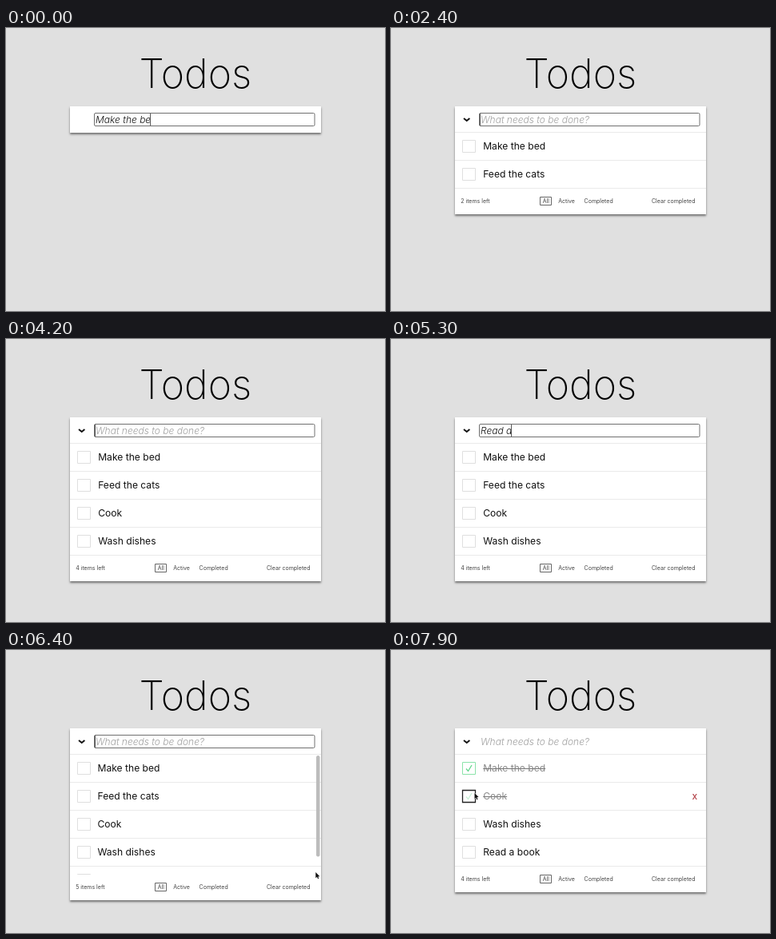
Recreate the animation shown at these times as an HTML page with a canvas. Size 474x354 px, loop 8 s.

```html
<!DOCTYPE html>
<html lang="en">
<head>
<meta charset="utf-8">
<title>Todos</title>
<style>
  html, body { margin: 0; width: 100%; height: 100%; overflow: hidden; background: #e0e0e0; }
  canvas { display: block; width: 474px; height: 354px; }
</style>
</head>
<body>
<canvas id="stage"></canvas>
<script>
const W = 474, H = 354, LOOP = 8000, STEP = 100;
const LEFT = 80, RIGHT = 394, TOP = 98, LIST_TOP = 130.5, ROW = 35, MAX_LIST = 150;
const canvas = document.getElementById('stage');
const ctx = canvas.getContext('2d');
const dpr = window.devicePixelRatio || 1;
canvas.width = W * dpr;
canvas.height = H * dpr;

// Each todo: typing start, characters visible at every step, moment of Enter.
const todos = [
  { text: 'Make the bed', start: 0, typed: [11, 12], enter: 300, done: 7500 },
  { text: 'Feed the cats', start: 600, typed: [1, 2, 3, 4, 6, 8, 9, 10, 11, 12, 13], enter: 1700, removed: 7000 },
  { text: 'Cook', start: 2500, typed: [1, 2, 4], enter: 2800, done: 7800 },
  { text: 'Wash dishes', start: 3300, typed: [1, 2, 3, 4, 6, 7, 9, 10, 11], enter: 4200 },
  { text: 'Read a book', start: 4800, typed: [1, 2, 3, 4, 4, 6, 8, 9, 11], enter: 5700 }
];
const BLUR = 7000;

// Pointer path: time, x, y
const path = [
  [6300, 390, 296], [6700, 372.5, 181.5], [7100, 372.5, 181.5],
  [7400, 99, 149], [7600, 99, 149], [7700, 104.5, 179], [8000, 104.5, 179]
];

function pointerAt(t) {
  if (t < path[0][0]) return null;
  const i = path.findIndex(p => p[0] > t);
  const [t0, x0, y0] = path[i - 1], [t1, x1, y1] = path[i];
  const k = (t - t0) / (t1 - t0), e = k * k * (3 - 2 * k);
  return { x: x0 + (x1 - x0) * e, y: y0 + (y1 - y0) * e };
}

function text(str, x, y, size, color = '#111', weight = 400, style = 'normal') {
  ctx.font = `${style} ${weight} ${size}px Inter, sans-serif`;
  ctx.fillStyle = color;
  ctx.fillText(str, x, y);
  return ctx.measureText(str).width;
}

function fill(x, y, w, h, color) {
  ctx.fillStyle = color;
  ctx.fillRect(x, y, w, h);
}

function box(x, y, w, h, color, width = 1, radius = 0) {
  ctx.strokeStyle = color;
  ctx.lineWidth = width;
  ctx.beginPath();
  ctx.roundRect(x, y, w, h, radius);
  ctx.stroke();
}

function line(points, color, width) {
  ctx.strokeStyle = color;
  ctx.lineWidth = width;
  ctx.beginPath();
  points.forEach(([x, y]) => ctx.lineTo(x, y));
  ctx.stroke();
}

function separator(y) {
  fill(LEFT, y - 0.5, RIGHT - LEFT, 1, '#eaeaea');
}

function drawCard(bottom) {
  ctx.save();
  ctx.shadowColor = 'rgba(0,0,0,.5)';
  ctx.shadowBlur = 2.5 * dpr;
  ctx.shadowOffsetY = 2 * dpr;
  fill(LEFT, TOP, RIGHT - LEFT, bottom - TOP, '#fff');
  ctx.restore();
}

function drawInput(t) {
  const typing = todos.find(d => t >= d.start && t < d.enter);
  let end = 112;
  if (typing) {
    const i = Math.min(Math.floor((t - typing.start) / STEP), typing.typed.length - 1);
    end += text(typing.text.slice(0, typing.typed[i]), 112, 118.8, 12, '#111', 300, 'italic');
  } else {
    text('What needs to be done?', 112, 118.8, 12, '#a0a0a0', 300, 'italic');
  }
  if (t >= BLUR) return;
  box(110.5, 106.5, 275.5, 16, '#707070', 1, 1.5);
  const last = todos.filter(d => d.enter <= t).pop();
  const lit = typing || Math.floor((t - last.enter) / 300) % 2 === 0;
  if (lit) fill(Math.round(end) - 1, 107, 1, 15, '#555');
}

function drawRow(todo, y, t, pointer, scrolls) {
  const mid = y + ROW / 2, done = t >= todo.done;
  const hover = pointer && pointer.y > y && pointer.y < y + ROW;
  const onBox = hover && pointer.x < 107;
  box(89.5, mid - 7.5, 16, 15, onBox ? '#222' : done ? '#8be3aa' : '#dfdfdf', onBox ? 1.3 : 1);
  if (done) {
    ctx.globalAlpha = Math.min(1, 0.1 + (t - todo.done) / 400);
    line([[94, mid + 0.5], [96.5, mid + 3.5], [101, mid - 4]], '#62d68b', 1.3);
    ctx.globalAlpha = 1;
  }
  const x = scrolls ? 114.5 : 115.2;
  const w = text(todo.text, x, mid + 4, 12.1, done ? '#8c8c8c' : '#111');
  if (done) fill(x, mid, w, 1, '#777');
  if (hover) text('x', scrolls ? 371 : 376.6, mid + 4, 12, pointer.x > 360 ? '#c2506c' : '#b5484e', 500);
  separator(y + ROW);
}

function drawFooter(y, count) {
  const base = y + 18.5, color = '#444';
  text(`${count} items left`, 87.2, base, 7, color);
  text('All', 189.7, base, 7, color);
  box(186.5, y + 11, 14, 10, '#666');
  text('Active', 209.2, base, 7, color);
  text('Completed', 241.6, base, 7, color);
  text('Clear completed', 326, base, 7, color);
}

function drawPointer({ x, y }) {
  const shape = [[0, 0], [0, 7.2], [1.7, 5.7], [2.8, 8.2], [4, 7.7], [2.9, 5.3], [5.1, 5.1]];
  ctx.beginPath();
  shape.forEach(([dx, dy]) => ctx.lineTo(x + dx, y + dy));
  ctx.closePath();
  ctx.strokeStyle = '#fff';
  ctx.lineWidth = 1;
  ctx.stroke();
  ctx.fillStyle = '#111';
  ctx.fill();
}

function draw(t) {
  ctx.setTransform(dpr, 0, 0, dpr, 0, 0);
  fill(0, 0, W, H, '#e0e0e0');
  ctx.textAlign = 'center';
  text('Todos', 236.8, 74.5, 50, '#000', 250);
  ctx.textAlign = 'left';

  const items = todos.filter(d => t >= d.enter && !(t >= d.removed));
  const full = items.length * ROW, shown = Math.min(full, MAX_LIST);
  const scrolls = full > shown, footer = LIST_TOP + shown;
  const pointer = pointerAt(t);

  drawCard(items.length ? footer + 32.5 : 131);
  drawInput(t);
  if (items.length) {
    line([[91, 113], [94.7, 116], [98.4, 113]], '#111', 1.9);
    separator(LIST_TOP);
    ctx.save();
    ctx.beginPath();
    ctx.rect(LEFT, LIST_TOP, RIGHT - LEFT, shown + 0.5);
    ctx.clip();
    items.forEach((d, i) => drawRow(d, LIST_TOP + i * ROW, t, pointer, scrolls));
    if (scrolls) {
      ctx.fillStyle = '#bcbcbc';
      ctx.beginPath();
      ctx.roundRect(388, 132, 4.5, 126.5, 2.2);
      ctx.fill();
    }
    ctx.restore();
    drawFooter(footer, items.length);
  }
  if (pointer) drawPointer(pointer);
}

const begin = performance.now();
function tick() {
  const t = (performance.now() - begin) % LOOP;
  draw(Math.floor(t / STEP) * STEP);
  requestAnimationFrame(tick);
}
tick();
</script>
</body>
</html>
```
